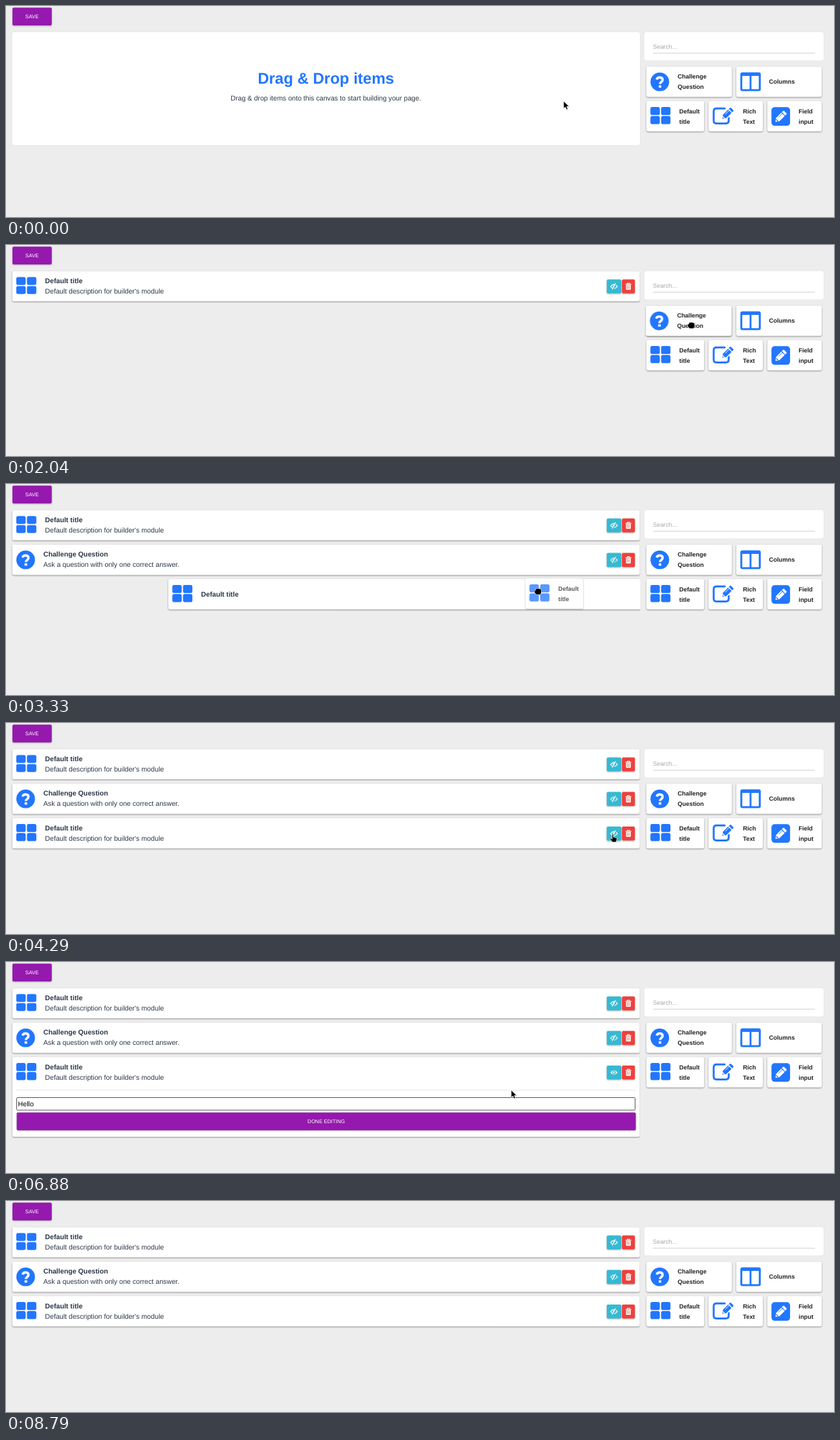
Animation, 1280 px wide and 326 px high, one loop 8.83 s. Source, as an HTML page:

```html
<!DOCTYPE html>
<html lang="en">
<head>
<meta charset="utf-8">
<title>Page builder</title>
<style>
  html, body { margin: 0; width: 100%; height: 100%; overflow: hidden; background: #ededed; }
  svg { display: block; width: 100vw; height: 100vh; }
  text { font-family: "Liberation Sans", Arial, sans-serif; text-rendering: geometricPrecision; white-space: pre; }
  .card { fill: #fff; filter: drop-shadow(0 1.4px 1.3px rgba(0,0,0,.4)); }
  .panel { fill: #fff; filter: drop-shadow(0 0 1px rgba(0,0,0,.06)); }
  .button { filter: drop-shadow(0 1px 1px rgba(0,0,0,.3)); }
  .glow { fill: #249fb8; filter: blur(2.6px); }
  .label { font-size: 9.333px; font-weight: bold; fill: #222; }
  .body { font-size: 10.667px; fill: #2d3748; }
  .bold { font-weight: bold; }
  .caps { font-size: 8px; fill: #fff; text-anchor: middle; }
</style>
</head>
<body>
<svg id="stage" viewBox="0 0 1280 326"></svg>
<script>
const LOOP = 8830;
const BLUE = '#2276ff', PURPLE = '#9519ae', TEAL = '#37b9d2', RED = '#ee403c';
const CARD_H = 46.6;

const rect = (x, y, w, h, r, attrs = '') =>
  `<rect x="${x}" y="${y}" width="${w}" height="${h}" rx="${r}" ${attrs}/>`;
const text = (x, y, cls, str, attrs = '') =>
  `<text x="${x}" y="${y}" class="${cls}" ${attrs}>${str}</text>`;
const group = (x, y, content, attrs = '') =>
  `<g transform="translate(${x} ${y})" ${attrs}>${content}</g>`;

const pencil = color =>
  `<g fill="${color}" transform="rotate(-45)">
    <path d="M-11.5 0L-6.5 -3.7H5V3.7H-6.5Z"/><path d="M6.2 -3.7H8.6Q10 -3.7 10 -2.3V2.3Q10 3.7 8.6 3.7H6.2Z"/>
  </g>`;

// Icons are placed relative to the top left corner of their card.
const icons = {
  grid: [6.2, 22.7].map(x => [9, 23].map(y => rect(x, y, 14.5, 12.4, 2.8, `fill="${BLUE}"`)).join('')).join(''),
  question: `<circle cx="20.7" cy="23.4" r="14.4" fill="${BLUE}"/>` + group(20.5, 23.4,
    `<path d="M-4.5 -3.6C-3.3 -8.2 4.5 -7.6 4.5 -3C4.5 .2 .5 .2 .5 3.4" fill="none" stroke="#fff" stroke-width="3.7"/>` +
    rect(-1.5, 5.2, 4, 3.8, 0.8, 'fill="#fff"')),
  columns: rect(6.2, 8.8, 31.6, 28.8, 3.2, `fill="${BLUE}"`) +
    rect(9.2, 14.2, 11.3, 20.4, 0.5, 'fill="#fff"') + rect(23.4, 14.2, 11.3, 20.4, 0.5, 'fill="#fff"'),
  edit: `<path d="M25 11.2H12.4Q8 11.2 8 15.6V30Q8 34.4 12.4 34.4H26.8Q31.2 34.4 31.2 30V25.5"
      fill="none" stroke="${BLUE}" stroke-width="3" stroke-linecap="round"/>` +
    group(29.5, 19, rect(-12, -5.2, 23, 10.4, 1, 'fill="#fff" transform="rotate(-45)"') + pencil(BLUE) +
      '<path d="M-3.5 1.2L4 -6.3" stroke="#fff" stroke-width="1"/>' +
      '<path d="M-7.6 4.6L-4.6 7.6" stroke="#fff" stroke-width="1.4"/>'),
  field: rect(6.3, 9.2, 28.8, 28.8, 5, `fill="${BLUE}"`) +
    group(20.6, 23.8, pencil('#fff') + `<path d="M-3 .8L3.6 -5.8" stroke="${BLUE}" stroke-width="1"/>` +
      `<path d="M-7 4L-4 7" stroke="${BLUE}" stroke-width="1.4"/>`),
};

const eyeOpen = `<path d="M-5.6 0Q0 -7 5.6 0Q0 7 -5.6 0Z" fill="#fff"/>
  <circle r="2.7" fill="${TEAL}"/><circle cx="-.3" cy="-.2" r="1.3" fill="#fff"/>`;
const eyeOff = `<path d="M-5.3 0Q0 -6.4 5.3 0Q0 6.4 -5.3 0Z" fill="none" stroke="#fff" stroke-width="1.1"/>
  <circle r="1.8" fill="#fff"/>
  <path d="M3.6 -4.6L-2 5.2" stroke="${TEAL}" stroke-width="1.4"/>
  <path d="M2.6 -5L-3 4.8" stroke="#fff" stroke-width="1.1"/>`;
const trash = `<path d="M-4.6 -3.6H4.6M-1.7 -3.8V-5.1H1.7V-3.8" fill="none" stroke="#fff" stroke-width="1.1"/>
  <path d="M-3.7 -2.6H3.7V4Q3.7 5.2 2.6 5.2H-2.6Q-3.7 5.2 -3.7 4Z" fill="#fff"/>
  <path d="M-1.7 -1.3V3.8M0 -1.3V3.8M1.7 -1.3V3.8" stroke="${RED}" stroke-width=".6"/>`;

const cursors = {
  arrow: `<path d="M0 0V11.4L2.6 9L4.5 13.2L6.6 12.3L4.8 8.2H8.6Z" fill="#000" stroke="#fff" stroke-width=".7"/>`,
  fist: `<path d="M-5 -.5Q-5 -2 -3.5 -2L-2.8 -4Q-1.6 -5.2 -.6 -4.2Q.8 -5.4 1.8 -4.2Q3.2 -5 4 -3.7Q5.6 -3.8 5.6 -2.2V1.4L4.4 5H-2.2L-5 1.6Z"
    fill="#000" stroke="#fff" stroke-width=".6"/>`,
  point: `<path d="M-1 0Q0 -1.3 1 0V4.2L5.6 5.2Q6.6 5.6 6.4 7L5.4 12H-.6L-4 7.4Q-4 5.8 -2.6 6.2L-1 7.4Z"
    fill="#000" stroke="#fff" stroke-width=".7"/>`,
  beam: `<path d="M-2 -5.4Q0 -5.4 0 -4Q0 -5.4 2 -5.4M0 -4V4M-2 5.4Q0 5.4 0 4Q0 5.4 2 5.4M-1.2 1.6H1.2"
    fill="none" stroke="#222" stroke-width="1"/>`,
};

const palette = [
  { x: 990, y: 93.8, w: 132, icon: 'question', tx: 48.3, lines: ['Challenge', 'Question'] },
  { x: 1129, y: 93.8, w: 132, icon: 'columns', tx: 50.5, lines: ['Columns'] },
  { x: 990, y: 147.1, w: 89.3, icon: 'grid', tx: 50.8, lines: ['Default', 'title'] },
  { x: 1086, y: 147.1, w: 84, icon: 'edit', tx: 53.2, lines: ['Rich', 'Text'] },
  { x: 1177, y: 147.1, w: 84, icon: 'field', tx: 48.3, lines: ['Field', 'input'] },
];
const cardBody = c => rect(0, 0, c.w, CARD_H, 2.7, 'class="card"') + icons[c.icon] +
  c.lines.map((s, i) => text(c.tx, (c.lines.length > 1 ? 18.6 : 26.6) + i * 16, 'label', s)).join('');

const gridItem = { card: palette[2], tx: 50.6, title: 'Default title', desc: "Default description for builder's module" };
const quizItem = { card: palette[0], tx: 48, title: 'Challenge Question', desc: 'Ask a question with only one correct answer.' };
const items = [
  { ...gridItem, y: 40.4, lift: 1010, enter: 1094, drop: 1500, hold: [1016, 178] },
  { ...quizItem, y: 93.8, lift: 2030, enter: 2110, drop: 2400, hold: [1060, 124] },
  { ...gridItem, y: 147.1, lift: 3040, enter: 3200, drop: 3500, hold: [1009, 167] },
];
const itemBody = (item, i) =>
  rect(0, 0, 970, CARD_H, 2.7, `class="card" id="box${i}"`) + icons[item.card.icon] +
  text(item.tx, 26.6, 'body bold', item.title, `id="title${i}"`) +
  `<g id="done${i}">` + text(item.tx, 34.6, 'body', item.desc) +
  rect(918.5, 14, 23.5, 23, 3, `class="glow" id="glow${i}"`) +
  rect(919, 12.8, 22.4, 21.6, 2, `class="button" fill="${TEAL}"`) +
  rect(942.5, 12.8, 20, 21.6, 2, `class="button" fill="${RED}"`) +
  group(930.2, 23.7, eyeOff, `id="off${i}"`) + group(930.2, 23.7, eyeOpen, `id="open${i}"`) +
  group(952.5, 23.7, trash) + '</g>';

const stage = document.getElementById('stage');
stage.innerHTML = `<defs><clipPath id="area"><rect width="980.3" height="326"/></clipPath></defs>` +
  rect(0, 0, 1280, 326, 0, 'fill="#ededed"') +
  rect(10, 2.6, 60.7, 27.4, 2, `class="button" id="save" fill="${PURPLE}"`) + text(40.2, 19, 'caps', 'SAVE') +
  '<g id="empty">' + rect(9.5, 40.2, 970.5, 174.8, 4, 'class="panel"') +
  text(494.5, 119.6, 'bold', 'Drag &amp; Drop items', `font-size="24" fill="${BLUE}" text-anchor="middle"`) +
  text(494.5, 146.3, 'body', 'Drag &amp; drop items onto this canvas to start building your page.', 'text-anchor="middle"') + '</g>' +
  '<g clip-path="url(#area)">' + items.map((it, i) => group(9.7, it.y, itemBody(it, i), `id="item${i}"`)).join('') + '</g>' +
  '<g id="editor">' + rect(16, 197.5, 957, 1, 0, 'fill="#e2e2e2"') +
  rect(16.5, 209.5, 956, 19.4, 1.3, 'id="input" fill="#fff" stroke="#666"') +
  text(18.6, 222.7, '', '', 'id="typed" font-size="10.667"') +
  rect(0, 213.2, 0.8, 12, 0, 'id="caret"') +
  rect(16.6, 232.6, 957, 27.4, 2, `class="button" fill="${PURPLE}"`) +
  text(495, 248.7, 'caps', 'DONE EDITING') + '</g>' +
  rect(986.6, 40.2, 277.4, 44, 4, 'class="panel"') +
  text(1000, 65.6, '', 'Search...', 'font-size="9.333" fill="#a8a8a8"') +
  rect(1000, 72.5, 250.5, 0.9, 0, 'fill="#c9c9c9"') +
  palette.map(c => group(c.x, c.y, cardBody(c))).join('') +
  items.map((it, i) => `<g id="ghost${i}" opacity=".74">${cardBody(it.card)}</g>`).join('') +
  '<g id="pointer">' + Object.entries(cursors).map(([k, v]) => `<g id="${k}">${v}</g>`).join('') + '</g>';

const $ = id => document.getElementById(id);
const show = (id, on) => { $(id).style.display = on ? '' : 'none'; };
const move = (id, x, y) => $(id).setAttribute('transform', `translate(${x} ${y})`);
const within = (t, a, b) => t >= a && t < b;
const clamp = v => Math.min(1, Math.max(0, v));
const ramp = (t, a, b) => clamp((t - a) / (b - a));

// Pointer stops: time, x, y
const path = [
  [460, 862, 147], [930, 1016, 178], [1010, 1016, 178], [1420, 762, 151], [1500, 752, 150],
  [1560, 752, 150], [1950, 1060, 124], [2030, 1060, 124], [2330, 772, 140], [2400, 765, 145],
  [2500, 783, 177], [2930, 1009, 167], [3040, 1009, 167], [3330, 822, 166], [3500, 770, 166],
  [3580, 772, 166], [4060, 938, 118], [4140, 938, 120], [4290, 938, 172], [4450, 938, 172],
  [4960, 685.5, 224], [6620, 685.5, 224], [6880, 781, 198], [7230, 938, 172], [7560, 938, 172],
  [8080, 40, 16], [8260, 40, 16], [8460, 46, -16],
];
function pointerAt(t) {
  const next = path.findIndex(p => p[0] > t);
  if (next === 0) return path[0].slice(1);
  if (next < 0) return path[path.length - 1].slice(1);
  const [t0, x0, y0] = path[next - 1], [t1, x1, y1] = path[next];
  const p = (t - t0) / (t1 - t0), e = p * p * (3 - 2 * p);
  return [x0 + (x1 - x0) * e, y0 + (y1 - y0) * e];
}

const OPEN = 4380, CLOSE = 7360, FOCUS = 4990;
const keys = [5380, 5630, 5750, 5960, 6130];

function render(t) {
  const [px, py] = pointerAt(t);
  const editing = within(t, OPEN, CLOSE);
  let dragging = false;

  show('empty', t < items[0].drop);
  items.forEach((it, i) => {
    const lifted = within(t, it.lift, it.drop), dropped = t >= it.drop;
    dragging = dragging || lifted;
    show('ghost' + i, lifted);
    move('ghost' + i, it.card.x + px - it.hold[0], it.card.y + py - it.hold[1]);

    const left = (1 - ramp(t, it.enter, it.enter + 260)) ** 2;
    show('item' + i, t >= it.enter);
    move('item' + i, 9.7 + 980 * left, it.y + (it.card.y - it.y) * left);
    $('title' + i).setAttribute('y', dropped ? 18.6 : 26.6);
    show('done' + i, dropped);
    const open = i === 2 && editing;
    show('open' + i, open);
    show('off' + i, !open);
    $('box' + i).setAttribute('height', open ? 122.8 : CARD_H);
  });

  $('glow0').style.opacity = 0;
  $('glow1').style.opacity = ramp(t, 4000, 4090) - ramp(t, 4160, 4290);
  $('glow2').style.opacity = 0.75 * (ramp(t, 4260, 4400) - ramp(t, 5060, 5230) +
    ramp(t, 7190, 7330) - ramp(t, 8610, 8780));

  show('editor', editing);
  const pressed = keys.filter(k => k <= t);
  const typed = $('typed');
  typed.textContent = 'Hello'.slice(0, pressed.length);
  const lastKey = pressed.length ? pressed[pressed.length - 1] : FOCUS;
  show('caret', t >= FOCUS && (t - lastKey) % 1000 < 500);
  if (editing) $('caret').setAttribute('x', 18.6 + (pressed.length ? typed.getComputedTextLength() : 0));
  $('input').setAttribute('stroke', t >= FOCUS ? '#505050' : '#767676');

  const onSave = px > 10 && px < 71 && py > 2 && py < 30;
  $('save').setAttribute('fill', onSave ? '#8a17a2' : PURPLE);
  const onEye = px > 929 && px < 951 &&
    items.some(it => t > it.drop && py > it.y + 12 && py < it.y + 35);
  const onInput = editing && py > 209 && py < 229;
  const shape = dragging ? 'fist' : onSave || onEye ? 'point' : onInput ? 'beam' : 'arrow';
  Object.keys(cursors).forEach(k => show(k, k === shape));
  show('pointer', t < 8460);
  move('pointer', px, py);
}

const start = performance.now();
function tick() {
  render((performance.now() - start) % LOOP);
  requestAnimationFrame(tick);
}
tick();
</script>
</body>
</html>
```
